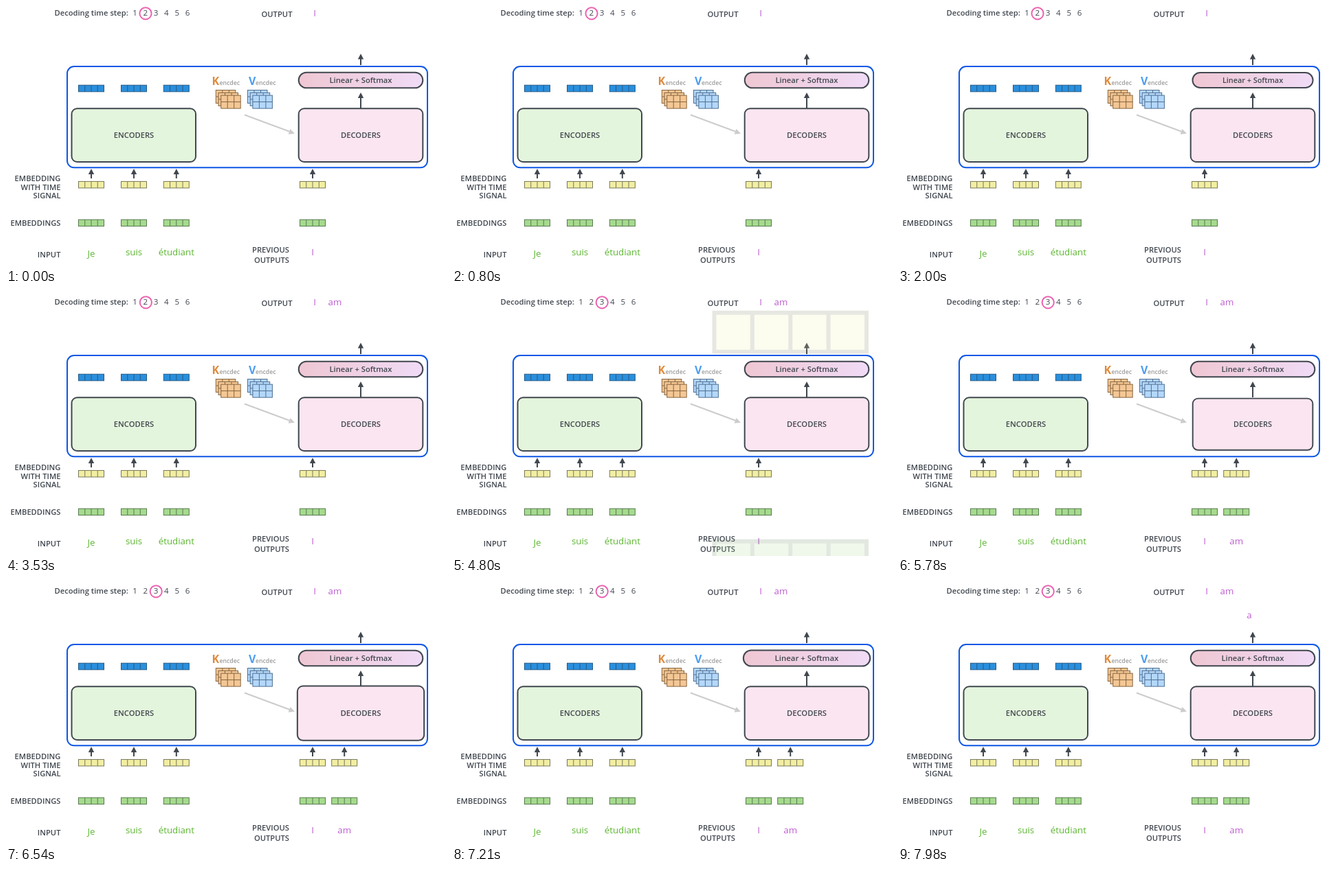
An HTML page that plays this animation: 640x380 px, repeating every 8000 ms.

```html
<!DOCTYPE html>
<html lang="en">
<head>
<meta charset="utf-8">
<title>Decoding time steps</title>
<style>
  html, body { margin: 0; width: 100%; height: 100%; overflow: hidden; background: #fff; }
  svg { display: block; width: 640px; height: 380px; font-family: "Open Sans", sans-serif; }
  .label { font-size: 11.2px; font-weight: 600; fill: #41474f; }
  .word { font-size: 13.3px; text-anchor: middle; }
  .digit { font-size: 11.6px; font-weight: 500; fill: #41474f; text-anchor: middle; }
  .big { font-size: 16px; font-weight: 700; }
  .sub { font-size: 8.7px; font-weight: 600; fill: #999; }
  .end { text-anchor: end; }
  .mid { text-anchor: middle; }
  .box { stroke: #41474f; stroke-width: 2; }
</style>
</head>
<body>
<svg id="stage" viewBox="0 0 640 380">
  <defs>
    <linearGradient id="pill">
      <stop offset="0" stop-color="#efc7d3"/>
      <stop offset="1" stop-color="#f0dbf6"/>
    </linearGradient>
  </defs>
</svg>
<script>
const LOOP = 8000;
const INK = '#41474f', GREEN = '#5cb531', PURPLE = '#bd5bd0';

const text = (x, y, s, cls, fill) =>
  `<text x="${x}" y="${y}" class="${cls}"${fill ? ` fill="${fill}"` : ''}>${s}</text>`;

const rect = (x, y, w, h, r, attrs) =>
  `<rect x="${x}" y="${y}" width="${w}" height="${h}" rx="${r}" ${attrs}/>`;

function grid(x, y, cols, rows, w, h, fill, stroke) {
  let d = '';
  for (let i = 1; i < cols; i++) d += `M${x + w * i / cols} ${y}v${h}`;
  for (let i = 1; i < rows; i++) d += `M${x} ${y + h * i / rows}h${w}`;
  return `<g fill="${fill}" stroke="${stroke}">${rect(x, y, w, h, 0, '')}<path d="${d}"/></g>`;
}

const vector = (cx, cy, fill, stroke) => grid(cx - 18.5, cy - 4.75, 4, 1, 37, 9.5, fill, stroke);

const arrow = (x, top, bottom) =>
  `<path d="M${x} ${top}l4.2 8h-3.2V${bottom}h-2V${top + 8}h-3.2z" fill="${INK}"/>`;

// Arrow, time-signal vector, embedding and word of one token
const token = (x, word, fill, baseline = 362.5) =>
  arrow(x, 237, 251) +
  vector(x, 260.2, '#f2eea2', '#77785a') +
  vector(x, 315.8, '#a6da8e', '#587a50') +
  text(x, baseline, word, 'word', fill);

const stack = (x, y, fill, stroke) =>
  [0, 1, 2].map(i => grid(x + i * 3.7, y + i * 3.8, 3, 2, 28.5, 19, fill, stroke)).join('');

const columns = [124, 186, 247.8];

document.getElementById('stage').innerHTML +=
  text(70.5, 14.3, 'Decoding time step:', 'label') +
  [1, 2, 3, 4, 5, 6].map((n, i) => text(187.5 + i * 15.3, 14.3, n, 'digit')).join('') +
  `<circle id="ring" cx="203" cy="10.8" r="8.6" fill="none" stroke="#ec5fb0" stroke-width="2"/>` +
  text(371.5, 16, 'OUTPUT', 'label') +
  text(449, 14.5, 'I', 'word', PURPLE) +

  rect(89, 88, 524, 147.3, 10, 'fill="none" stroke="#0d57e6" stroke-width="2"') +
  columns.map(x => vector(x, 120, '#2a8fdd', '#235a86')).join('') +
  rect(95.5, 149.3, 180.5, 77.7, 8, 'class="box" fill="#e4f5dd"') +
  text(186, 192.3, 'ENCODERS', 'label mid') +

  text(299.5, 115, 'K', 'big', '#e08a3c') + text(310.5, 115, 'encdec', 'sub') +
  text(353, 115, 'V', 'big', '#4d9df0') + text(363, 115, 'encdec', 'sub') +
  stack(305.3, 122.5, '#f4c795', '#86653f') +
  stack(351.5, 122.5, '#b4d8fb', '#4f6f90') +
  `<path d="M347 158.5L413 183" stroke="#ccc" stroke-width="2"/>` +
  `<path d="M420 185.7l-6.5-6.8-2.9 7.8z" fill="#ccc"/>` +

  arrow(516, 126, 149) + arrow(516, 69.5, 86) +
  `<g id="decoders">${rect(425.7, 149.3, 180.6, 77.7, 8, 'class="box" fill="#fbe5f0"')}` +
  text(516, 192.3, 'DECODERS', 'label mid') + '</g>' +
  `<g id="softmax">${rect(425.7, 96.7, 180.6, 22.6, 11.3, 'class="box" fill="url(#pill)"')}` +
  text(516, 112, 'Linear + Softmax', 'label mid') + '</g>' +

  text(79.5, 255, 'EMBEDDING', 'label end') +
  text(79.5, 267.5, 'WITH TIME', 'label end') +
  text(79.5, 280, 'SIGNAL', 'label end') +
  text(79.5, 320.3, 'EMBEDDINGS', 'label end') +
  text(79.5, 366.3, 'INPUT', 'label end') +
  text(412, 358.5, 'PREVIOUS', 'label end') +
  text(412, 374, 'OUTPUTS', 'label end') +
  token(columns[0], 'Je', GREEN, 365) +
  token(columns[1], 'suis', GREEN) +
  token(columns[2], 'étudiant', GREEN) +
  token(446, 'I', PURPLE) +
  `<g id="next">${token(492.2, 'am', PURPLE)}</g>` +
  `<g id="am">${text(478.5, 14.5, 'am', 'word', PURPLE)}</g>` +
  `<g id="a">${text(511, 14.5, 'a', 'word', PURPLE)}</g>`;

const [ring, decoders, softmax, next, am, a] =
  ['ring', 'decoders', 'softmax', 'next', 'am', 'a'].map(id => document.getElementById(id));

const progress = (t, start, length) => Math.min(1, Math.max(0, (t - start) / length));
const smooth = p => p * p * (3 - 2 * p);

// Quick swell, dip and settle
function pop(t, starts) {
  return starts.reduce((s, start) => {
    const u = progress(t, start - 20, 320);
    return s + 0.04 * Math.sin(8.2 * u) * Math.min(1, 3 - 3 * u);
  }, 1);
}

function scale(el, cx, cy, s) {
  el.setAttribute('transform', `translate(${cx} ${cy}) scale(${s}) translate(${-cx} ${-cy})`);
}

function rise(el, t, start) {
  const p = progress(t, start, 240);
  el.setAttribute('transform', `translate(0 ${106 * (1 - p) ** 2})`);
  el.setAttribute('opacity', Math.min(1, p * 2.5));
}

function draw(t) {
  scale(decoders, 516, 188.2, pop(t, [500, 1500, 5640, 6540]));
  scale(softmax, 516, 108, pop(t, [1810, 7210]));
  rise(am, t, 2460);
  rise(a, t, 7880);
  ring.setAttribute('cx', 203 + 15.2 * smooth(progress(t, 3460, 770)));
  const grow = smooth(progress(t, 4600, 770));
  scale(next, 492.2, 301.5, 7 - 6 * grow);
  next.setAttribute('opacity', grow);
}

const begin = performance.now();
function tick() {
  draw((performance.now() - begin) % LOOP);
  requestAnimationFrame(tick);
}
tick();
</script>
</body>
</html>
```
